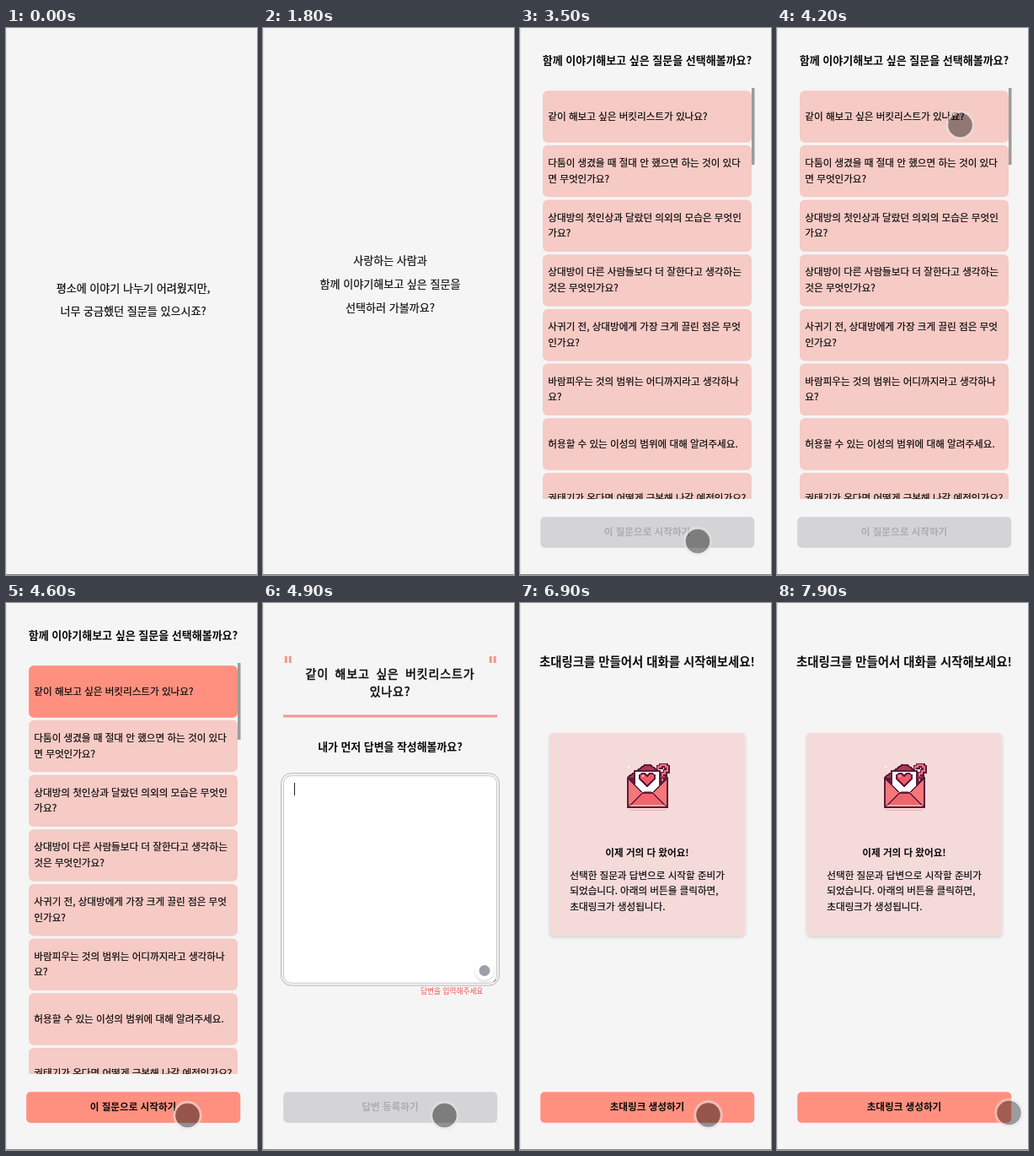
Recreate the animation shown at these times as an HTML page. Size 298 by 648 pixels, loop 8 s.

```html
<!DOCTYPE html>
<html lang="ko">
<head>
<meta charset="utf-8">
<style>
html, body { margin: 0; height: 100%; overflow: hidden; background: #f5f5f5; }
svg { display: block; width: 100vw; height: 100vh; }
text { font-family: 'Noto Sans CJK KR', 'Noto Sans CJK JP', 'Noto Sans CJK', sans-serif; fill: #0a0a0a; white-space: pre; }
.mid { text-anchor: middle; }
.bold { font-weight: 700; }
.dark { stroke: #0a0a0a; stroke-width: .2px; }
.pixel { stroke: #0a0a0a; stroke-width: .5px; letter-spacing: .85px; word-spacing: 2.7px; }
</style>
</head>
<body>
<svg id="stage" viewBox="0 0 298 648" lang="ko"></svg>
<script>
const CORAL = '#ff9080', ANSWER = '눈덮인 한라산을 함께 올라보고 싶어';

const rect = (x, y, w, h, fill, more = '') =>
  `<rect x="${x}" y="${y}" width="${w}" height="${h}" fill="${fill}" ${more}/>`;
const poly = (points, fill, more = '') => `<polygon points="${points}" fill="${fill}" ${more}/>`;
const text = (s, x, y, size, cls = '', more = '') =>
  `<text x="${x}" y="${y}" font-size="${size}" class="${cls}" ${more}>${s}</text>`;
const center = (s, y, size, cls = '') => text(s, 151, y, size, 'mid ' + cls);
const group = (id, body, more = '') => `<g id="${id}" ${more}>${body}</g>`;
const button = (label, on) =>
  rect(24.2, 579.3, 254, 36.4, on ? CORAL : '#d4d4d6', 'rx="5"') +
  text(label, 151, 601.3, 11.6, 'mid bold', on ? '' : 'style="fill:#adadaf"');

// Question list
const questions = [
  ['같이 해보고 싶은 버킷리스트가 있나요?'],
  ['다툼이 생겼을 때 절대 안 했으면 하는 것이 있다', '면 무엇인가요?'],
  ['상대방의 첫인상과 달랐던 의외의 모습은 무엇인', '가요?'],
  ['상대방이 다른 사람들보다 더 잘한다고 생각하는', '것은 무엇인가요?'],
  ['사귀기 전, 상대방에게 가장 크게 끌린 점은 무엇', '인가요?'],
  ['바람피우는 것의 범위는 어디까지라고 생각하나', '요?'],
  ['허용할 수 있는 이성의 범위에 대해 알려주세요.'],
  ['권태기가 온다면 어떻게 극복해 나갈 예정인가요?']
];
const item = (lines, i) => {
  const y = 74.2 + i * 64.67;
  const first = y + (lines.length > 1 ? 25 : 34.4);
  return rect(27, y, 248, 61.5, '#f6cac5', 'rx="6"') +
    (i ? '' : rect(27, y, 248, 61.5, CORAL, 'rx="6" id="picked"')) +
    lines.map((s, n) => text(s, 33.3, first + n * 18.7, 11.6, 'dark')).join('');
};

// Answer form
const quote = x => rect(x, 63, 3, 8, '#f5988a') + rect(x + 5, 63, 3, 8, '#f5988a');
const form =
  quote(25.7) + quote(268.7) +
  center('같이 해보고 싶은 버킷리스트가', 89, 14, 'pixel') +
  center('있나요?', 110, 14, 'pixel') +
  rect(24, 132.5, 254, 3, '#f5988a') +
  center('내가 먼저 답변을 작성해볼까요?', 175, 12.9, 'bold') +
  rect(21.5, 201.7, 259, 251.5, '#f3f3f3', 'rx="12" stroke="#b8b8b8"') +
  rect(24.5, 204.7, 253, 245.5, '#fff', 'rx="9" stroke="#c8c8c8"') +
  '<path d="M274 449l3-3" stroke="#777"/>' +
  '<circle cx="263" cy="435.5" r="11" fill="#fff" filter="url(#shade)"/>' +
  '<circle id="badge" cx="263" cy="435.5" r="6.5"/>' +
  text('', 37.5, 223.8, 11.55, 'dark', 'id="typed"') +
  rect(37, 213, 1, 15, '#222', 'id="caret"') +
  text('답변을 입력해주세요', 187, 463.3, 8.7, '', 'id="error" style="fill:#ff4d4d"') +
  button('답변 등록하기') + group('formOn', button('답변 등록하기', true));

// Pixel envelope with a heart letter
const DARK = '#5b1c3c';
const heart = '151,217 142,208 142,204 145,202 148,202 151,205 154,202 157,202 160,204 160,208';
const mark = 'M164 197v-3h3v-2h6v2h2v5h-3v3h-3v3M169 208v3';
const envelope = `<g shape-rendering="crispEdges">` +
  poly('127,206 148,191 155,191 176,206 176,243 127,243', DARK) +
  poly('129,207 149,193 154,193 174,207', '#b8344f') +
  rect(135, 198, 32, 30, DARK) + rect(137, 200, 28, 30, '#fff') +
  poly(heart, '#ef5a66', `stroke="${DARK}" stroke-width="1.5"`) + rect(145, 204, 2, 2, '#ffc4c0') +
  poly('129,209 146,225 129,241', '#f4777a') + poly('174,209 157,225 174,241', '#f4777a') +
  poly('129,241 148,223 155,223 174,241', '#f0656c') +
  `<path d="M128 208l18 17h11l18-17M129 241l18-17M174 241l-18-17" fill="none" stroke="${DARK}" stroke-width="1.3"/>` +
  rect(131, 239, 41, 2, '#ffaaa0') +
  `<path d="${mark}" fill="none" stroke="${DARK}" stroke-width="5"/>` +
  `<path d="${mark}" fill="none" stroke="#f0707a" stroke-width="2"/>` +
  rect(128, 193, 2, 2, '#fff') + rect(133, 197, 1, 1, '#fff') +
  rect(130, 245, 43, 1, '#e6a8aa') + '</g>';

const invite =
  center('초대링크를 만들어서 대화를 시작해보세요!', 75, 14.4, 'bold') +
  rect(35, 154, 232.5, 240.5, '#f5dada', 'rx="5" filter="url(#shade)"') + envelope +
  center('이제 거의 다 왔어요!', 300, 11.6, 'bold') +
  ['선택한 질문과 답변으로 시작할 준비가', '되었습니다. 아래의 버튼을 클릭하면,', '초대링크가 생성됩니다.']
    .map((s, i) => text(s, 59.3, 326.7 + i * 18.7, 11.6, 'dark')).join('') +
  button('초대링크 생성하기', true);

document.getElementById('stage').innerHTML =
  `<defs>
    <filter id="shade" x="-30%" y="-30%" width="160%" height="160%">
      <feDropShadow dx="0" dy="1.5" stdDeviation="1.8" flood-opacity=".18"/>
    </filter>
    <clipPath id="window"><rect x="24" y="71" width="255" height="487"/></clipPath>
  </defs>` +
  rect(0, 0, 298, 648, '#f5f5f5') +
  group('hello', center('평소에 이야기 나누기 어려웠지만,', 312.8, 13.05, 'dark') +
    center('너무 궁금했던 질문들 있으시죠?', 339.8, 13.05, 'dark')) +
  group('intro', group('introText', ['사랑하는 사람과', '함께 이야기해보고 싶은 질문을', '선택하러 가볼까요?']
    .map((s, i) => center(s, 279.8 + i * 28, 13.05, 'dark')).join('')) +
    group('start', button('시작하기', true))) +
  group('list', center('함께 이야기해보고 싶은 질문을 선택해볼까요?', 43, 13, 'bold') +
    group('items', questions.map(item).join(''), 'clip-path="url(#window)"') +
    rect(275, 71, 3.5, 91, '#9c9c9c') +
    button('이 질문으로 시작하기') + group('listOn', button('이 질문으로 시작하기', true))) +
  group('form', form) +
  group('invite', invite) +
  group('cursor', '<circle r="15.7" fill="none" stroke="#e4e4e4" stroke-opacity=".55" stroke-width="3"/>' +
    '<circle r="14.3" fill="#000" fill-opacity=".41"/>') +
  rect(0, 0, 1, 648, '#e0e0e0') + rect(0, 647, 298, 1, '#808080');

const el = {};
document.querySelectorAll('[id]').forEach(e => el[e.id] = e);

const ramp = (t, a, b) => Math.min(1, Math.max(0, (t - a) / (b - a)));
const show = (id, opacity) => {
  el[id].style.display = opacity > 0 ? '' : 'none';
  el[id].style.opacity = Number(opacity);
};

// time, x, y, opacity
const path = [
  [2800, 211, 626, 0], [2900, 211, 617, .5], [3000, 211, 608, 1], [3700, 211, 608, 1],
  [4200, 217.5, 115, 1], [4300, 217.5, 115, 1], [4600, 215.5, 607, 1], [4900, 215.5, 607, 1],
  [5200, 215.5, 607, 0], [5800, 223.5, 606.5, 0], [6100, 223.5, 606.5, 1], [6900, 223.5, 606.5, 1],
  [7600, 262, 668, 1], [7700, 271, 641, .85], [7900, 275.5, 604, .88], [8000, 275.5, 604, .88]
];
function moveCursor(t) {
  const i = path.findIndex(k => k[0] > t);
  if (i < 1) return show('cursor', 0);
  const a = path[i - 1], b = path[i], p = ramp(t, a[0], b[0]);
  const [, x, y, o] = a.map((v, n) => v + (b[n] - v) * p);
  el.cursor.setAttribute('transform', `translate(${x} ${y})`);
  show('cursor', o);
}

function draw(t) {
  show('hello', 1 - ramp(t, 400, 600));
  show('intro', t < 3500);
  show('introText', ramp(t, 1700, 1803));
  show('start', ramp(t, 2400, 2700));
  show('list', t >= 3500 && t < 4700);
  show('picked', ramp(t, 4200, 4400));
  show('listOn', ramp(t, 4200, 4500));
  show('form', t >= 4700 && t < 6800);
  show('formOn', ramp(t, 5700, 6000));
  show('invite', t >= 6800);

  el.typed.textContent = t < 5500 ? '' : t < 5600 ? ANSWER.slice(0, 11)
    : t < 5800 ? ANSWER.slice(0, -1) + 'ㅇ' : ANSWER;
  show('error', t >= 4800 && t < 5800);
  show('caret', t < 5500 || t >= 6400);
  el.caret.setAttribute('x', t < 5500 ? 37 : 208.5);
  el.badge.setAttribute('fill', t < 5800 ? '#9ba0a8' : '#0f2b46');
  moveCursor(t);
}

function tick(now) {
  draw(Math.floor(now % 8000 / 100) * 100);
  requestAnimationFrame(tick);
}
draw(0);
requestAnimationFrame(tick);
</script>
</body>
</html>
```
